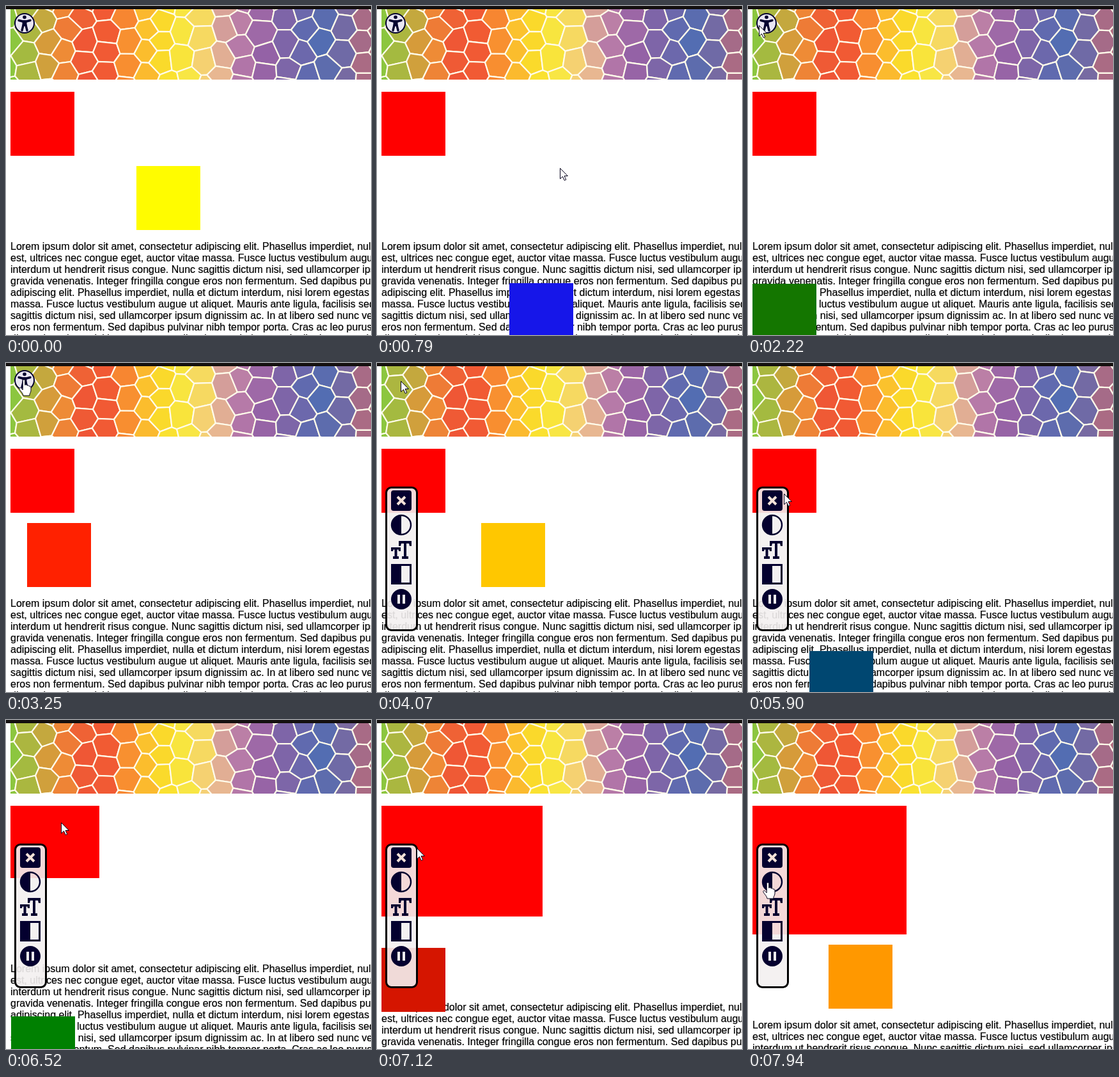
An HTML page for the animation above (8 s loop, 571 by 514 pixels).

```html
<!DOCTYPE html>
<html lang="en">
<head>
<meta charset="utf-8">
<title>Accessibility panel</title>
<style>
html, body { margin: 0; width: 100%; height: 100%; overflow: hidden; background: #fff; }
svg { display: block; }
text { font: 16px "Liberation Sans", Arial, sans-serif; white-space: pre; stroke: #000; stroke-width: .2px; }
</style>
</head>
<body>
<svg id="stage" width="571" height="514" viewBox="0 0 571 514">
  <defs>
    <clipPath id="band"><rect x="7" y="5" width="564" height="110"/></clipPath>
  </defs>
  <rect width="571" height="5" fill="#14100f"/>
  <g id="mosaic" clip-path="url(#band)" stroke="#fffbea" stroke-width="2.2" stroke-linejoin="round"/>
  <rect id="red" x="7" y="134" fill="#f00"/>
  <g id="copy"/>
  <rect id="box" width="100" height="100"/>

  <g id="badge">
    <circle cx="29" cy="27" r="15" fill="#e9e6f2" stroke="#04002f" stroke-width="2"/>
    <g fill="#04002f" stroke="#04002f" stroke-linecap="round" stroke-linejoin="round">
      <circle cx="29" cy="17.5" r="2.8" stroke="none"/>
      <path d="M20 22.5 26 24h6l6-1.5" fill="none" stroke-width="3.4"/>
      <path d="M27 24h4v6h-4z" stroke-width="3"/>
      <path d="M27 30 25 38M31 30 33 38" fill="none" stroke-width="3.4"/>
    </g>
  </g>

  <g id="panel">
    <rect x="14.5" y="194.5" width="48" height="223" rx="8" fill="#f3f0f0" fill-opacity=".9" stroke="#000" stroke-width="3"/>
    <g fill="#04002f">
      <rect x="22" y="199" width="32" height="32" rx="4"/>
      <path d="M32 209 44 221M44 209 32 221" stroke="#f3e1d8" stroke-width="4"/>
      <circle cx="38" cy="253" r="15" fill="none" stroke="#04002f" stroke-width="2.4"/>
      <path d="M38 238a15 15 0 0 0 0 30z"/>
      <path d="M34 278h20v8h-3l-1-4h-4v20h3v4H39v-4h3v-20h-4l-1 4h-3z"/>
      <path d="M22 288h15v6h-3l-.5-2.5h-2V302H34v4h-9v-4h2.500v-10.500h-2L25 294h-3z"/>
      <rect x="23.5" y="315.5" width="29" height="29" fill="none" stroke="#04002f" stroke-width="3"/>
      <rect x="23" y="315" width="15" height="30"/>
      <circle cx="38" cy="369" r="16"/>
      <path d="M32 362h4v14h-4zM40 362h4v14h-4z" fill="#f3f0f0"/>
    </g>
  </g>

  <g fill="#fff" stroke="#04001c" stroke-linejoin="round">
    <path id="arrow" d="M.5.5V17l4-3.500 2.700 6 2.500-1.100-2.600-5.900h5.200z"/>
    <path id="hand" d="M-1.800 1.500C-1.800-.5 1.700-.5 1.700 1.500V8.500C2.500 7.300 5 7.600 5.200 9.300 6 8.400 8 8.800 8.200 10.400 9.200 9.700 11 10.300 11 12V17C11 20 9 21 8.700 25H-1C-1.500 21-5 18.500-7 15-8 13-5.500 11.700-4 13.500L-1.800 16z"/>
  </g>
</svg>

<script>
const $ = id => document.getElementById(id);
const LOOP = 8000, PANEL_OPEN = 3640;

function set(node, attrs) {
  for (const k in attrs) node.setAttribute(k, attrs[k]);
}
function add(parent, tag, attrs, text = "") {
  const node = document.createElementNS("http://www.w3.org/2000/svg", tag);
  set(node, attrs);
  node.textContent = text;
  parent.appendChild(node);
}
const show = (node, on) => set(node, { visibility: on ? "visible" : "hidden" });
const mix = (a, b, p) => a + (b - a) * p;
const mixAll = (a, b, p) => a.map((v, i) => mix(v, b[i], p));
const rgb = c => `rgb(${c.map(Math.round)})`;

// CSS "ease": cubic-bezier(.25, .1, .25, 1)
function ease(x) {
  if (x <= 0) return 0;
  if (x >= 1) return 1;
  const bez = (s, a, b) => 3 * (1 - s) * (1 - s) * s * a + 3 * (1 - s) * s * s * b + s * s * s;
  let lo = 0, hi = 1;
  for (let i = 0; i < 24; i++) {
    const s = (lo + hi) / 2;
    if (bez(s, .25, .25) < x) lo = s; else hi = s;
  }
  return bez(lo, .1, 1);
}

// Linear track of [time, ...values]
function track(keys, t) {
  let i = 0;
  while (i < keys.length - 2 && t >= keys[i + 1][0]) i++;
  const [t0, ...a] = keys[i], [t1, ...b] = keys[i + 1];
  return mixAll(a, b, Math.min(1, Math.max(0, (t - t0) / (t1 - t0))));
}

// ---- Mosaic banner: Voronoi cells of a jittered grid, coloured along a rainbow
const rainbow = "8cc63f b8b040 ee8b36 ef5435 f25d33 fbab2f fae02a f8e645 f3c58c b679a8 9462a6 7a66a8 506db3 6f6aa6 b26b80"
  .split(" ").map((hex, i) => [7 + i * 40, ...hex.match(/../g).map(h => parseInt(h, 16))]);

let seed = 7;
const jitter = size => {
  seed = seed * 16807 % 2147483647;
  return (seed / 2147483647 - .5) * size;
};

// Keep the part of poly that is nearer to a than to b
function clipNearer(poly, a, b) {
  const side = p => (p[0] - (a[0] + b[0]) / 2) * (b[0] - a[0]) + (p[1] - (a[1] + b[1]) / 2) * (b[1] - a[1]);
  const out = [];
  poly.forEach((p, i) => {
    const q = poly[(i + 1) % poly.length], dp = side(p), dq = side(q);
    if (dp <= 0) out.push(p);
    if (dp * dq < 0) out.push(mixAll(p, q, dp / (dp - dq)));
  });
  return out;
}

const cells = [];
for (let col = 0; col < 20; col++) {
  for (let row = -1; row < 4; row++) {
    cells.push([col * 31 + jitter(17), 20 + row * 36 + col % 2 * 18 + jitter(17)]);
  }
}
for (const a of cells) {
  let poly = [[-20, -60], [620, -60], [620, 180], [-20, 180]];
  for (const b of cells) if (b !== a) poly = clipNearer(poly, a, b);
  add($("mosaic"), "polygon", {
    points: poly.map(p => p.map(v => v.toFixed(1))).join(" "),
    fill: rgb(track(rainbow, a[0]))
  });
}

// ---- Paragraph
[
  "Lorem ipsum dolor sit amet, consectetur adipiscing elit. Phasellus imperdiet, nulla et",
  "est, ultrices nec congue eget, auctor vitae massa. Fusce luctus vestibulum augue ut",
  "interdum ut hendrerit risus congue. Nunc sagittis dictum nisi, sed ullamcorper ipsum",
  "gravida venenatis. Integer fringilla congue eros non fermentum. Sed dapibus pulvinar",
  "adipiscing elit. Phasellus imperdiet, nulla et dictum interdum, nisi lorem egestas odio",
  "massa. Fusce luctus vestibulum augue ut aliquet. Mauris ante ligula, facilisis sed",
  "sagittis dictum nisi, sed ullamcorper ipsum dignissim ac. In at libero sed nunc venenatis",
  "eros non fermentum. Sed dapibus pulvinar nibh tempor porta. Cras ac leo purus. Mauris",
  "dictum interdum, nisi lorem egestas odio, vitae scelerisque enim ligula venenatis dolor"
].forEach((line, i) => add($("copy"), "text", { x: 7, y: 15 + i * 18 }, line));

// ---- Motion
// The screen refreshes about five times a second
const refresh = t => Math.max(0, Math.floor((t + 27) / 204) * 204 - 27);

// The box goes round a square, one side a second, and stalls while the panel opens
const corners = [
  { at: [0, 0], color: [255, 0, 0] },
  { at: [200, 0], color: [255, 255, 0] },
  { at: [200, 200], color: [0, 0, 255] },
  { at: [0, 200], color: [0, 128, 0] }
];
const lap = [[0, .85], [3441, 4.327], [3904, 4.327], [4869, 5.311], [7929, 8.344]];

const pointer = [
  [177, 464, 330], [789, 286, 253], [1197, 87, 82], [2217, 17, 30], [3441, 30, 25],
  [4053, 37, 28], [4869, 25, 235], [6191, 65, 195], [6501, 86, 160], [7929, 31, 254]
];
const hovers = [[4400, 4620], [6191, 7591]];

// Hover transition; leaving early shortens the way back
function grown(t, duration) {
  const [on, off] = hovers.filter(h => h[0] <= t).pop() || [t, t];
  const peak = ease((Math.min(t, off) - on) / duration);
  const back = t > off ? ease((t - off) / (duration * peak)) : 0;
  return Math.round(200 * peak * (1 - back));
}

function overButton(t, x, y) {
  if (t < PANEL_OPEN) return Math.hypot(x - 29, y - 27) < 11;
  return x >= 22 && x <= 54 && y >= 199 && y <= 385 && (y - 199) % 38.5 <= 32;
}

function render(time) {
  const t = refresh(time);
  const open = t >= PANEL_OPEN;

  const height = 100 + grown(t, 4000);
  const top = 134 + height + 16;
  set($("red"), { width: 100 + grown(t, 2000), height });
  set($("copy"), { transform: `translate(0 ${top + 116})` });

  const [pos] = track(lap, t);
  const side = Math.floor(pos), p = ease(pos - side);
  const a = corners[side % 4], b = corners[(side + 1) % 4];
  const [dx, dy] = mixAll(a.at, b.at, p).map(Math.round);
  set($("box"), { x: 7 + dx, y: top + dy, fill: rgb(mixAll(a.color, b.color, p)) });

  show($("badge"), !open);
  show($("panel"), open);

  const [x, y] = track(pointer, t).map(Math.round);
  const hand = overButton(t, x, y);
  show($("arrow"), t > 0 && !hand);
  show($("hand"), t > 0 && hand);
  set($(hand ? "hand" : "arrow"), { transform: `translate(${x} ${y})` });
}

const start = performance.now();
function loop() {
  render((performance.now() - start) % LOOP);
  requestAnimationFrame(loop);
}
loop();
</script>
</body>
</html>
```
